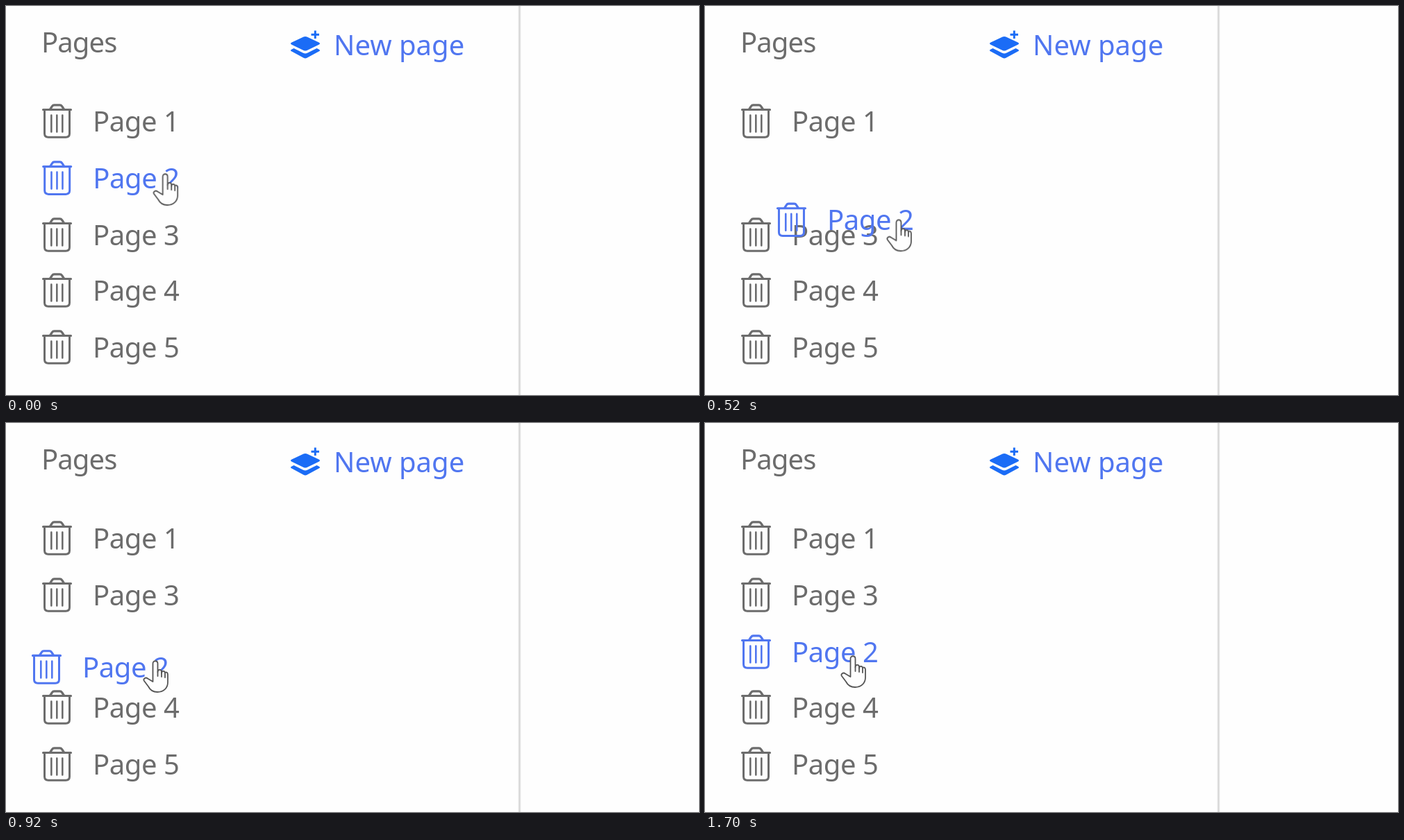
These frames come from a looping animation (998 by 561 pixels, 1720 ms). An HTML page:

```html
<!DOCTYPE html>
<html lang="en">
<head>
<meta charset="utf-8">
<title>Reorder pages</title>
<style>
  html, body { margin: 0; width: 100%; height: 100%; overflow: hidden; background: #fefefe; }
  svg { display: block; width: 100vw; height: 100vh; }
  text { font: 40px "Noto Sans", "Open Sans", sans-serif; letter-spacing: -.42px; fill: currentColor; }
  .title { letter-spacing: -.9px; }
  .new text { letter-spacing: 0; }
  .gray { color: #6c6c6c; }
  .blue { color: #5076f0; }
  .bin { fill: none; stroke: currentColor; stroke-linecap: round; stroke-linejoin: round; }
  .hand { fill: #fefefe; stroke: #555; stroke-width: 1.8; stroke-linejoin: round; stroke-linecap: round; }

  .drag, .swap, .cursor { animation: 1720ms linear infinite; }
  .drag { animation-name: drag; }
  .cursor { animation-name: cursor; }
  .swap { animation-name: swap; animation-timing-function: step-end; }

  @keyframes drag {
    0% { transform: translate(0, 82px); }
    11.63% { transform: translate(33px, 100px); }
    20.93% { transform: translate(48px, 119px); }
    30.23% { transform: translate(51px, 142px); }
    34.88% { transform: translate(47px, 163px); }
    39.53% { transform: translate(36.5px, 180px); }
    46.51% { transform: translate(8px, 187px); }
    53.49% { transform: translate(-15px, 186px); }
    61.62% { transform: translate(-18px, 181px); }
    61.63%, 100% { transform: translate(0, 164px); }
  }
  @keyframes cursor {
    0% { transform: translate(229px, 242px); }
    11.63% { transform: translate(267px, 262px); }
    20.93% { transform: translate(279px, 283px); }
    30.23% { transform: translate(279px, 308px); }
    34.88% { transform: translate(273px, 328px); }
    39.53% { transform: translate(261px, 341px); }
    46.51% { transform: translate(234px, 346px); }
    53.49% { transform: translate(215px, 343px); }
    61.63%, 100% { transform: translate(213px, 336px); }
  }
  /* the neighbour jumps into the free slot */
  @keyframes swap {
    0% { transform: translate(0, 164px); }
    33.72%, 100% { transform: translate(0, 82px); }
  }
</style>
</head>
<body>
<svg viewBox="0 0 998 561" preserveAspectRatio="none">
  <defs>
    <g id="bin" class="bin">
      <path stroke-width="3.2" d="M53.5 149.5H93.5M63.5 149L66.5 144.5Q67.5 142.8 69.5 142.8H77.5Q79.5 142.8 80.5 144.5L83.5 149"/>
      <path stroke-width="3" d="M55.5 150V184Q55.5 189.3 61 189.3H86Q91.5 189.3 91.5 184V150"/>
      <path stroke-width="2.6" d="M65.3 157.5V181.5M73.3 157.5V181.5M81.3 157.5V181.5"/>
    </g>
  </defs>

  <rect width="998" height="561" fill="#fefefe"/>
  <rect x="737" width="5" height="561" fill="#f5f5f5"/>
  <rect x="738.5" width="2" height="561" fill="#d4d4d4"/>

  <text class="title gray" x="51" y="67">Pages</text>
  <g class="new blue">
    <g fill="#1b6cf6">
      <path d="M428.5 44.5Q431 43.4 433.5 44.5L450.5 52.6Q453.5 54.2 450.5 55.8L433.5 63.9Q431 65 428.5 63.9L411.5 55.8Q408.5 54.2 411.5 52.6Z"/>
      <path d="M411.5 62.4L414.5 61L428 67.8Q431 69.3 434 67.8L447.5 61L450.5 62.4Q453.5 64 450.5 65.6L433.5 74.8Q431 76 428.5 74.8L411.5 65.6Q408.5 64 411.5 62.4Z"/>
      <path d="M443.8 35.5H446.8V39.7H451V42.7H446.8V47H443.8V42.7H439.5V39.7H443.8Z"/>
    </g>
    <text x="472" y="71">New page</text>
  </g>

  <g class="gray">
    <g><use href="#bin"/><text x="125" y="181">Page 1</text></g>
    <g class="swap"><use href="#bin"/><text x="125" y="181">Page 3</text></g>
    <g transform="translate(0 244)"><use href="#bin"/><text x="125" y="181">Page 4</text></g>
    <g transform="translate(0 326)"><use href="#bin"/><text x="125" y="181">Page 5</text></g>
  </g>
  <g class="drag blue"><use href="#bin"/><text x="125" y="181">Page 2</text></g>

  <g class="cursor">
    <path class="hand" d="M-3.5 4C-3.5 -1 3.5 -1 3.5 4V16C4 11.5 9 12 9 16V18C9.5 13.5 14 14 14 18C14.5 15.5 18 16 18 20V31C18 40 11 45 3 45C-3 45 -7 43 -10 37L-16 29C-18 26 -14 23 -11 25.5L-3.5 30Z"/>
    <path class="hand" d="M3.5 16V22M9 17V23M14 19V24"/>
  </g>
</svg>
</body>
</html>
```
